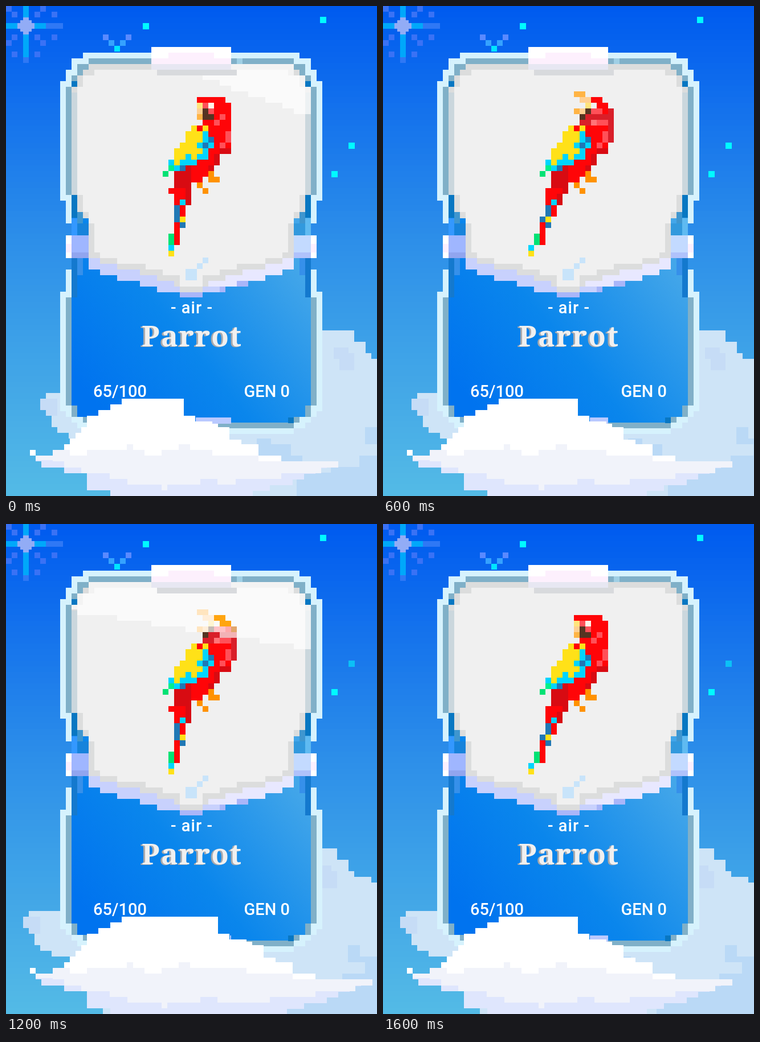
Write an HTML page with a canvas that moves like this. It is 651 px wide and 861 px high and loops after 1.7 s.

```html
<!DOCTYPE html>
<html lang="en">
<head>
<meta charset="utf-8">
<title>Parrot card</title>
<style>
html, body { margin: 0; width: 100%; height: 100%; overflow: hidden; background: #1878ea; }
canvas { display: block; width: 651px; height: 861px; }
</style>
</head>
<body>
<canvas id="stage" width="651" height="861"></canvas>
<script>
const ctx = document.getElementById('stage').getContext('2d');
const STEP = 100, STEPS = 17;

const RED = '#ff0508', DARK = '#d80b12', CRIMSON = '#d91f29', PINK = '#ff5058';
const YELLOW = '#ffe118', CYAN = '#00d5ff', BLUE = '#2078b5', GREEN = '#00e274';
const ORANGE = '#ff9200', BROWN = '#553422', TAN = '#ffcf91', CREAM = '#ffe47c', GOLD = '#ffb445';
const MILK = '#fff4e8';

// How many of the given marks have been reached.
const passed = (value, ...marks) => marks.filter(m => value >= m).length;

function box(color, x, y, w = 10, h = 10) {
  ctx.fillStyle = color;
  ctx.fillRect(x, y, w, h);
}

// One or more parrot cells of ten pixels.
function dot(color, x, y, w = 1, h = 1) {
  box(color, x * 10 + 5, y * 10, w * 10, h * 10);
}

function mirror(color, x, y, w, h) {
  box(color, x, y, w, h);
  box(color, 650 - x - w, y, w, h);
}

// Outline of alternating horizontal and vertical edges.
function stair(color, x, y, ...edges) {
  ctx.beginPath();
  ctx.moveTo(x, y);
  edges.forEach((v, i) => {
    if (i % 2) y = v; else x = v;
    ctx.lineTo(x, y);
  });
  ctx.fillStyle = color;
  ctx.fill();
}

// Symmetrical stepped shape: each pair is a right edge and where it ends.
function slabs(color, top, ...edges) {
  for (let i = 0; i < edges.length; i += 2) {
    const right = edges[i], end = edges[i + 1];
    box(color, 650 - right, top, 2 * right - 650, end - top);
    top = end;
  }
}

function sky() {
  const low = [84, 187, 230], mid = [45, 143, 233], top = [0, 91, 239];
  for (let y = 0; y < 861; y += 10) {
    const [a, b, p] = y < 410 ? [top, mid, y / 410] : [mid, low, (y - 410) / 450];
    const rgb = a.map((v, i) => Math.round(v + (b[i] - v) * p));
    box(`rgb(${rgb})`, 0, y, 651, 10);
  }
}

function snowflake() {
  for (const s of [-1, 1]) for (const t of [-1, 1]) {
    for (const [dx, dy] of [[20, 20], [30, 30], [50, 20], [20, 50]]) {
      box('#3a72f5', 30 + s * dx, 30 + t * dy);
    }
  }
  const cross = (color, from, length) => {
    box(color, from, 30, length, 10);
    box(color, 30, from, 10, length);
  };
  cross('#2f78f5', 0, 100);
  cross('#00a8fa', 0, 70);
  box('#00a8fa', 30, 0, 10, 90);
  cross('#92acf6', 20, 30);
  box('#92acf6', 25, 25, 20, 20);
}

function sparkles(step) {
  ctx.globalAlpha = { 2: 0.65, 3: 0.32, 4: 0.65, 8: 0.32 }[step] || 1;
  for (const x of [170, 210]) box('#5a8aff', x, 50);
  for (const x of [180, 200]) box('#35a2ff', x, 60);
  box('#00e5ff', 190, 70);
  ctx.globalAlpha = 1;

  const star = (x, y) => box('#00fbff', x, y, 11, 11);
  star(240, 30);
  star(551, 19);
  star(571, 290);
  if (step >= 9 && step <= 11) star(20, 430);
  ctx.globalAlpha = step === 12 || step === 16 ? 0.55 : 1;
  star(601, 240);
  ctx.globalAlpha = 1;
}

function backCloud(step) {
  const shade = '#c6dcf6', deep = '#bad9f6';
  ctx.save();
  ctx.translate(-10 * passed(step, 2, 7, 9), 0);
  stair('#cee4f7', 70, 680, 450, 570, 611, 590, 631, 610, 641, 620, 671, 630, 681, 650, 691, 861,
    200, 760, 110, 750, 90, 740, 80, 720, 70, 710, 60, 690, 70);
  box(shade, 60, 690, 30, 20);
  box(shade, 70, 710, 20, 10);
  box(shade, 585, 610, 26, 30);
  box(shade, 575, 600, 26, 20);
  stair(deep, 630, 740, 651, 760, 691, 861, 510, 820, 570, 810, 620, 790, 660, 770, 630);
  stair(deep, 440, 760, 465, 770, 500, 790, 520, 800, 440);
  ctx.restore();
}

function frame() {
  slabs('#d6f2fd', 82, 515, 92, 535, 112, 545, 132, 555, 342, 545, 382, 535, 463, 545, 502,
    555, 712, 545, 722, 535, 732, 525, 742, 505, 752);
  slabs('#80b0c8', 92, 505, 102, 525, 122, 535, 142, 545, 332, 535, 512, 545, 702,
    535, 722, 515, 732, 505, 742);

  const blue = ctx.createLinearGradient(170, 715, 500, 445);
  blue.addColorStop(0, '#0073ef');
  blue.addColorStop(0.45, '#0a86ec');
  blue.addColorStop(1, '#43a6e9');
  slabs(blue, 332, 535, 702, 525, 722, 505, 732);

  mirror('#0877c2', 115, 132, 10, 10);
  mirror('#0877c2', 115, 332, 10, 40);
  mirror('#3f96cf', 125, 342, 10, 40);
  box('#3398ff', 115, 373, 10, 30);
  box('#1783db', 125, 382, 20, 21);
  box('#5fbaf1', 525, 373, 10, 30);
  box('#3299dd', 505, 382, 20, 21);
  mirror('#1479ce', 115, 443, 10, 69);
  mirror('#3690ea', 125, 443, 10, 30);
  box('#0877c2', 495, 723);
}

function whitePanel() {
  slabs('#c8d1fd', 403, 515, 443, 505, 463, 485, 473, 455, 483, 415, 493, 385, 503, 345, 512);
  stair('#e8e8ff', 345, 443, 505, 463, 485, 473, 455, 483, 415, 493, 345);
  box('#a9b6f9', 305, 503, 40, 9);
  box('#a9b6f9', 375, 493);
  box('#a9b6f9', 405, 483, 20, 10);
  slabs('#dcdddd', 102, 505, 112, 515, 122, 525, 142, 535, 332, 525, 362, 515, 373, 505, 443,
    485, 453, 455, 463, 415, 473, 385, 483, 355, 493, 345, 503);
  slabs('#f0f0f0', 112, 495, 122, 515, 142, 525, 332, 515, 362, 505, 382, 495, 433,
    485, 443, 455, 453, 405, 463, 375, 473, 345, 493);
  mirror('#cbd7dd', 115, 152, 10, 180);
  box('#c8e4fa', 315, 462, 20, 20);
  box('#c8e4fa', 335, 452);
  box('#c8e4fa', 345, 442);

  box('#9fb6ff', 115, 403, 30, 30);
  box('#91a5ef', 115, 433, 30, 10);
  box('#c3daff', 505, 403, 30, 30);
  box('#b0c2fb', 505, 433, 30, 10);
  mirror('#fff', 105, 403, 10, 40);
  mirror('#fceffe', 105, 418, 10, 15);
}

function tape() {
  box('#d8dadd', 265, 112, 140, 10);
  box('#9fcfe5', 405, 92);
  box('#fff', 255, 72, 140, 20);
  box('#fdf0fd', 255, 92, 140, 10);
  box('#fdf0fd', 285, 82, 80, 10);
  box('#e7e7f2', 255, 102, 140, 10);
}

function body() {
  stair(RED, 345, 200, 395, 260, 375, 280, 365, 290, 355, 300, 345, 310, 325, 290, 315, 260, 355, 220, 335, 210, 345);
  dot(DARK, 37, 25, 2);
  dot(DARK, 36, 26, 1, 2);
  dot(DARK, 35, 28);
  dot(DARK, 31, 28);
  dot(DARK, 29, 29, 3, 3);

  stair(YELLOW, 325, 210, 335, 220, 345, 240, 335, 250, 345, 260, 335, 270, 305, 280, 295, 250, 305, 240, 315, 220, 325);
  dot(YELLOW, 34, 21);
  dot(CYAN, 34, 22, 1, 4);
  dot(CYAN, 33, 24);
  dot(CYAN, 35, 24);
  dot(CYAN, 33, 26, 2);
  dot(CYAN, 31, 26);
  dot(CYAN, 30, 27, 3);
  dot(CYAN, 28, 27);
  dot(CYAN, 29, 28);
  dot(BLUE, 35, 23);
  dot(BLUE, 34, 24);
  dot(BLUE, 30, 28);
  dot('#00f08c', 28, 28);
  dot(GREEN, 27, 29);

  dot(PINK, 38, 22, 1, 2);
  dot(PINK, 37, 24);
  dot(ORANGE, 35, 29);
  dot(ORANGE, 35, 30, 2);
  dot(ORANGE, 33, 31);
  dot(ORANGE, 34, 32);
}

// The tail bends to the left, one cell more below each of the given rows.
function tail(step) {
  const pose = passed(step, 2, 3, 13, 14) - passed(step, 5, 7, 16);
  const bends = [[], [33, 37, 42], [33, 37, 39, 42, 43]][pose];
  const part = (color, x, y, w = 1, h = 1) => {
    for (let row = y; row < y + h; row++) dot(color, x - passed(row, ...bends), row, w);
  };
  part(RED, 28, 32, 3);
  part(RED, 29, 33, 2);
  part(RED, 29, 34);
  part(DARK, 31, 32, 1, 3);
  part(CYAN, 30, 34);
  part(BLUE, 29, 35, 1, 3);
  part(RED, 30, 35, 1, 2);
  part(YELLOW, 30, 37);
  part(BLUE, 30, 38);
  part(RED, 29, 38, 1, 4);
  part(GREEN, 28, 40, 1, 2);
  part(CYAN, 28, 42);
  part(YELLOW, 28, 43);
  if (pose === 2) {
    dot('#f0f0f0', 27, 37);
    dot(BLUE, 27, 38);
    dot(RED, 27, 39);
    dot('#f0f0f0', 25, 40);
  }
}

function headSide() {
  dot(RED, 33, 16, 5);
  dot(RED, 36, 17, 3, 3);
  dot(CREAM, 33, 17);
  dot(TAN, 33, 18);
  dot(GOLD, 33, 19);
  dot(PINK, 34, 17);
  dot(MILK, 35, 17);
  dot(BROWN, 34, 18, 1, 2);
  dot(BROWN, 35, 19);
  dot(PINK, 35, 18);
  dot(PINK, 37, 19);
  dot(PINK, 36, 20);
}

function headTurned() {
  dot(RED, 34, 16, 4);
  dot(RED, 37, 17, 2, 3);
  dot(CREAM, 34, 17, 2);
  dot(MILK, 36, 17);
  dot(TAN, 34, 18, 2);
  dot(TAN, 34, 19);
  dot(BROWN, 36, 18);
  dot(BROWN, 35, 19, 2);
  dot(CRIMSON, 34, 20, 2);
  dot(PINK, 37, 19);
  dot(PINK, 36, 20);
}

function headRaised() {
  dot(GOLD, 33, 15, 2);
  dot(GOLD, 33, 18);
  dot(TAN, 34, 16, 2);
  dot(TAN, 34, 18);
  dot(CREAM, 35, 17);
  dot(RED, 36, 16, 2);
  dot(RED, 37, 17, 2);
  dot(RED, 38, 18);
  dot(BROWN, 35, 18);
  dot(BROWN, 34, 19);
  dot(PINK, 36, 18, 2);
  dot(CRIMSON, 35, 19, 4, 2);
  dot(CRIMSON, 39, 18, 1, 6);
  dot(CRIMSON, 34, 20);
  dot('#ff7478', 36, 20);
  dot(PINK, 37, 20, 2);
}

function parrot(step) {
  body();
  tail(step);
  const pose = passed(step, 2, 5, 11) - passed(step, 8, 13, 13);
  [headSide, headTurned, headRaised][pose]();
}

// Lower edge at mid-card and slope of the light band.
function glareAt(step) {
  if (step < 4) return [122 + 257 * step, 0.36];
  if (step > 11 && step < 15) return [188 + 288 * (step - 12), 0.16 + 0.1 * (step - 12)];
}

function glare(step) {
  const band = glareAt(step);
  if (!band) return;
  const [low, slope] = band;
  ctx.save();
  ctx.beginPath();
  ctx.rect(145, 102, 360, 640);
  ctx.rect(125, 122, 20, 600);
  ctx.rect(505, 122, 20, 600);
  ctx.rect(115, 142, 10, 560);
  ctx.rect(525, 142, 10, 560);
  ctx.clip();
  ctx.globalAlpha = step === 3 ? 1 : 0.66;
  for (let x = 115; x < 535; x += 10) {
    const y = Math.round((low + (x - 330) * slope) / 10) * 10;
    box('#fff', x, y - 125, 10, 125);
  }
  ctx.restore();
  if (step === 12) {
    dot('#ffa510', 36, 16, 2);
    dot('#ffa510', 37, 17, 2);
    dot('#e3a66c', 39, 18);
  }
}

function label(text, x, y, font, color, align = 'left', spacing = '0px') {
  ctx.font = font;
  ctx.fillStyle = color;
  ctx.textAlign = align;
  ctx.letterSpacing = spacing;
  ctx.fillText(text, x, y);
}

function labels() {
  const small = '500 29px Roboto, sans-serif';
  const title = '900 50px "Noto Serif", serif';
  label('- air -', 326, 540, small, '#fff', 'center', '1px');
  label('65/100', 153, 687, small, '#fff');
  label('GEN 0', 498, 687, small, '#fff', 'right');
  label('Parrot', 235, 599, title, '#a7a9ae', 'left', '2px');
  label('Parrot', 238, 598, title, '#f0f0f0', 'left', '2px');
}

function frontCloud(step) {
  const d = 30 * (passed(step, 5, 11) - passed(step, 15));
  box('#b9c9ff', 333 + d, 723, Math.max(0, 62 - d), 11);
  stair('#fff', 203, 690, 312 + d, 720, 332 + d, 730, 362 + d, 734, 372 + d, 740, 392 + d, 762,
    413 + d, 770, 443 + d, 790, 483 + d, 800, 102, 770, 112, 760, 122, 750, 132, 740, 142, 720,
    162, 710, 183, 700, 203);
  stair('#dfe6fd', 52, 790, 82, 800, 563 + d, 812, 543 + d, 822, 523 + d, 832, 503 + d, 842,
    463 + d, 852, 433 + d, 861, 183, 851, 142, 821, 102, 811, 62, 800, 52);
  stair('#f1f3fa', 82, 780, 112, 790, 142, 780, 212, 770, 223, 780, 243, 790, 273, 780, 303, 770,
    323, 780, 362 + d, 790, 443 + d, 800, 583 + d, 811, 553 + d, 821, 483 + d, 831, 403 + d, 841,
    371, 831, 341, 841, 283, 851, 273, 841, 213, 831, 182, 821, 132, 811, 102, 800, 82);
  box('#f1f3fa', 52, 790, 30, 8);
  box('#fff', 42, 780);
}

function draw(step) {
  sky();
  snowflake();
  sparkles(step);
  backCloud(step);
  frame();
  whitePanel();
  parrot(step);
  glare(step);
  tape();
  labels();
  frontCloud(step);
}

function tick() {
  draw(Math.floor(performance.now() / STEP) % STEPS);
  requestAnimationFrame(tick);
}
tick();
</script>
</body>
</html>
```
